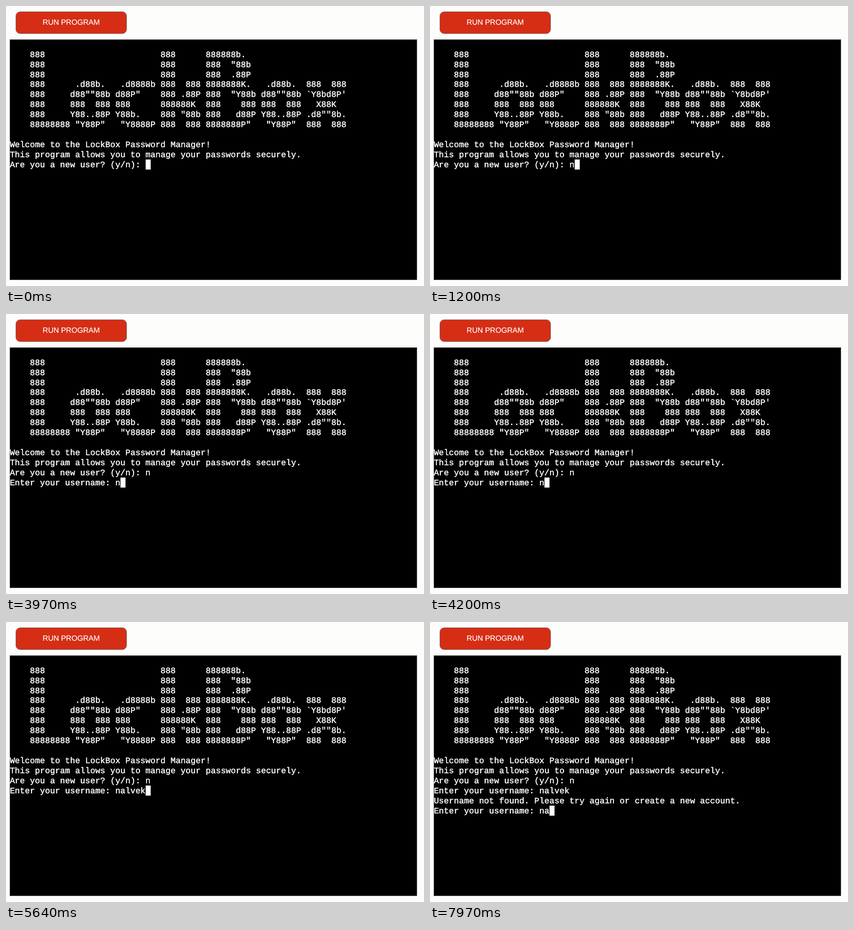
These frames come from a looping animation (913 by 613 pixels, 8000 ms). An HTML page:

```html
<!DOCTYPE html>
<html lang="en">
<head>
<meta charset="utf-8">
<title>Terminal session</title>
<style>
  html, body { margin: 0; width: 100%; height: 100%; overflow: hidden; background: #fdfdfc; }
  .run {
    position: absolute; left: 21px; top: 12px; width: 243px; height: 49px;
    box-sizing: border-box; border: 1px solid #7a7476; border-radius: 10px;
    background: #d52e15; color: #fff; text-align: center;
    font: 16.4px/47px "Liberation Sans", Arial, sans-serif;
    text-rendering: geometricPrecision;
    -webkit-text-stroke: .2px #fff;
  }
  .terminal {
    position: absolute; left: 8px; top: 73px; width: 890px; height: 527px;
    background: #000; box-shadow: inset 0 0 0 1px #666; overflow: hidden;
  }
  pre {
    --drop: 2.65px;
    position: absolute; left: .4px; top: var(--drop); margin: 0; color: #fff;
    font: 18.3px/21.95px "Liberation Mono", "Courier New", monospace;
    text-rendering: geometricPrecision;
    -webkit-text-stroke: .5px #fff;
  }
  .cursor {
    display: inline-block; position: relative; top: calc(-1 * var(--drop));
    vertical-align: top; width: .6em; height: 21.95px; background: #fff;
  }
</style>
</head>
<body>
<div class="run">RUN PROGRAM</div>
<div class="terminal"><pre>

    888                       888      888888b.
    888                       888      888  "88b
    888                       888      888  .88P
    888      .d88b.   .d8888b 888  888 8888888K.   .d88b.  888  888
    888     d88""88b d88P"    888 .88P 888  "Y88b d88""88b `Y8bd8P'
    888     888  888 888      888888K  888    888 888  888   X88K
    888     Y88..88P Y88b.    888 "88b 888   d88P Y88..88P .d8""8b.
    88888888 "Y88P"   "Y8888P 888  888 8888888P"   "Y88P"  888  888

Welcome to the LockBox Password Manager!
This program allows you to manage your passwords securely.
<span id="session"></span><span class="cursor"></span></pre></div>
<script>
  const LOOP = 8000;
  const USER = "nalvek";
  const ASK_NEW = "Are you a new user? (y/n): ";
  const ASK_NAME = "Enter your username: ";
  const NOT_FOUND = "Username not found. Please try again or create a new account.\n";

  // Each step appends output or a keystroke at its time in ms.
  const typed = (text, times) => times.map((at, i) => [at, text[i]]);
  const steps = [
    [0, ASK_NEW],
    [1200, "n"],
    [2100, "\n" + ASK_NAME],
    ...typed(USER, [3970, 4240, 4440, 4670, 4870, 5040]),
    [5770, "\n" + NOT_FOUND + ASK_NAME],
    ...typed(USER, [7800, 7970]),
  ];

  const session = document.getElementById("session");
  const start = performance.now();

  function draw(now) {
    const time = Math.max(0, now - start) % LOOP;
    const text = steps.filter(([at]) => at <= time).map(([, part]) => part).join("");
    if (session.textContent !== text) session.textContent = text;
    requestAnimationFrame(draw);
  }
  draw(start);
</script>
</body>
</html>
```
